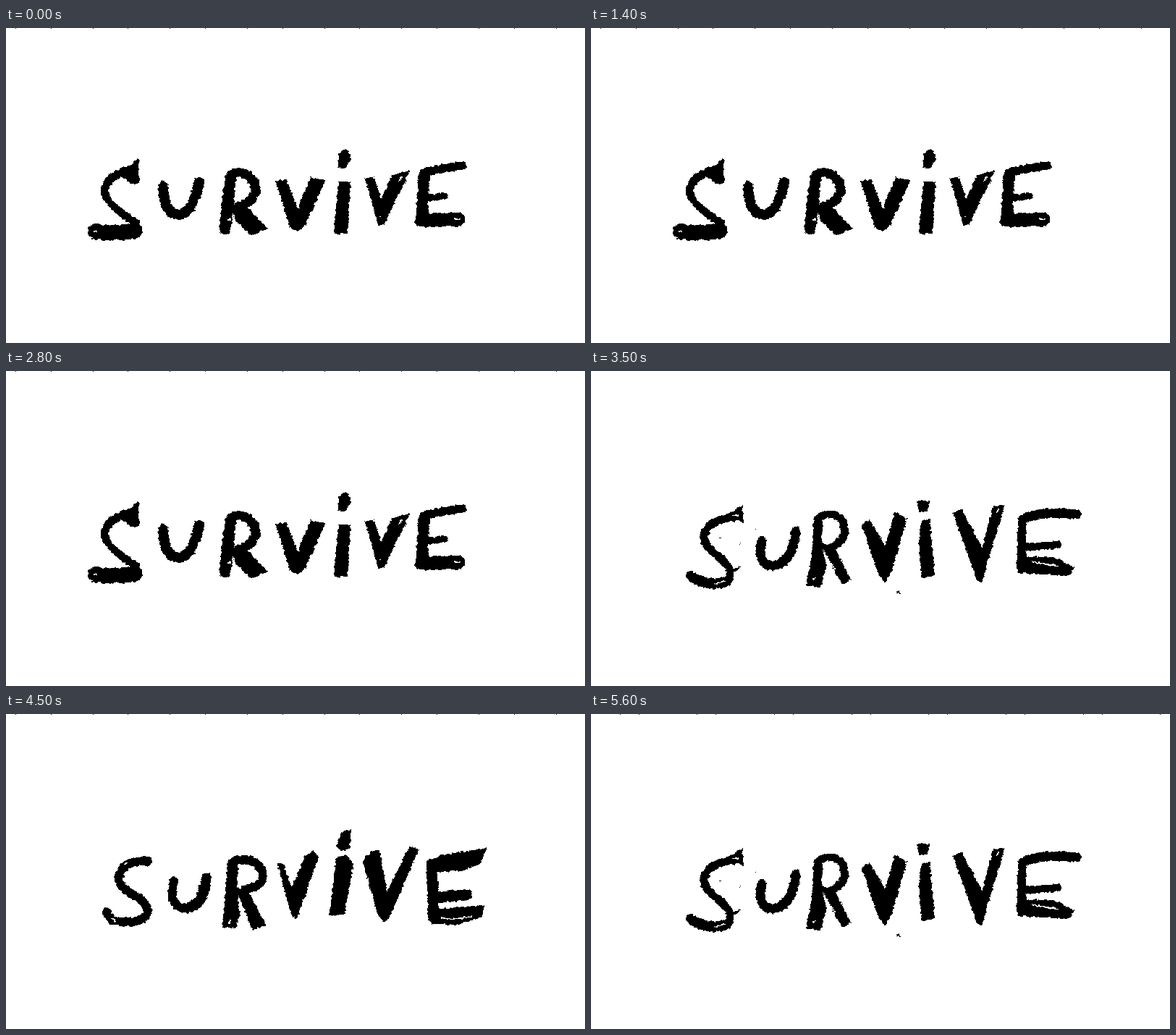
These frames come from a looping animation (800x435 px, 5.7 s). An HTML page:

```html
<!DOCTYPE html>
<html lang="en">
<head>
<meta charset="utf-8">
<title>Survive</title>
<style>
  html, body { margin: 0; width: 100%; height: 100%; overflow: hidden; background: #fff; }
  svg { display: block; width: 100%; height: 100%; }
</style>
</head>
<body>
<svg id="stage" viewBox="0 0 800 435" role="img" aria-label="Survive">
  <filter id="rough" x="0" y="0" width="800" height="435" filterUnits="userSpaceOnUse" color-interpolation-filters="sRGB">
    <feTurbulence type="fractalNoise" baseFrequency=".22" numOctaves="2" seed="4"/>
    <feDisplacementMap in="SourceGraphic" scale="5" xChannelSelector="R" yChannelSelector="G"/>
  </filter>
</svg>
<script>
const FRAME = 100;
// One letter per step: which drawing of the word is shown.
const ORDER = 'ACBCABABABABABACBACACABCABCBACABCABCBABCABABABABACABCBABC';

const stage = document.getElementById('stage');

function add(parent, tag, attrs) {
  const node = document.createElementNS('http://www.w3.org/2000/svg', tag);
  for (const key in attrs) node.setAttribute(key, attrs[key]);
  return parent.appendChild(node);
}

const show = (node, on) => node.setAttribute('visibility', on ? 'visible' : 'hidden');

// A word drawn with pen strokes of a given width, filled blots and scratched-out gaps.
function makeWord(draw) {
  const group = add(stage, 'g', {
    filter: 'url(#rough)', 'shape-rendering': 'crispEdges',
    'stroke-linecap': 'round', 'stroke-linejoin': 'round'
  });
  const line = (color, width, d) =>
    add(group, 'path', { d, fill: 'none', stroke: color, 'stroke-width': width });
  draw(
    (width, d) => line('#000', width, d),
    d => add(group, 'path', { d: d + 'Z', stroke: '#000', 'stroke-width': 2 }),
    d => line('#fff', 2, d)
  );
  return group;
}

const words = {
  A: makeWord((pen, blot, gap) => {
    // S
    pen(11, 'M172 195Q136 206 136 226Q138 242 180 270');
    blot('M160 204 182 181 183 214 170 213');
    pen(21, 'M123 281Q150 285 178 280');
    gap('M122 281h2');
    // U
    pen(14, 'M217 219Q218 258 240 258Q257 257 267 212');
    // R
    pen(16, 'M310 207 303 277');
    pen(13, 'M310 204Q320 194 336 205Q348 214 344 229Q338 242 318 248');
    blot('M312 248 333 249 360 277 338 285 318 265');
    gap('M309 265v-1');
    // V
    blot('M374 212 387 210 403 252 421 207 440 211 411 275 402 280 393 275');
    // i
    blot('M461 174 469 168 477 180 467 193 460 191');
    blot('M460 213 475 213 471 283 454 284');
    // V
    blot('M497 208 508 207 518 238 534 204 557 198 522 270 515 272');
    gap('M543 211 547 205');
    gap('M516 261h1');
    // E
    pen(16, 'M578 203 574 265');
    pen(12, 'M578 200Q600 194 630 190');
    pen(10, 'M580 235 606 232');
    pen(19, 'M574 266 625 264');
    gap('M621 264h6');
  }),

  B: makeWord((pen, blot, gap) => {
    // S
    pen(12, 'M197 203Q158 201 156 228Q157 240 180 252Q199 262 194 278Q182 292 146 285L139 273');
    gap('M165 208 167 206');
    gap('M147 283 151 286');
    // U
    pen(12, 'M232 231Q222 268 252 269');
    pen(15, 'M254 267Q272 262 277 226');
    // R
    pen(12, 'M316 203Q342 196 354 216Q360 238 330 242');
    blot('M308 202 320 206 319 240 322 278 317 294 300 294 303 255');
    blot('M318 240 334 246 358 291 341 297');
    gap('M309 288 310 285');
    // V
    blot('M376 208 382 207 395 242 414 197 424 190 431 197 402 281 396 280');
    // i
    blot('M464 164 476 160 474 185 463 188 458 182');
    blot('M457 200 470 195 479 207 467 275 448 278');
    // V
    blot('M494 203 505 190 516 189 526 249 558 183 569 188 530 278 522 286 514 275');
    // E
    pen(15, 'M588 207 591 281');
    blot('M582 205 600 196 663 186 655 206 630 216 597 217');
    pen(15, 'M596 253 636 250');
    blot('M588 271 660 265 657 279 625 290 588 289');
    gap('M602 282Q622 285 643 279');
  }),

  C: makeWord((pen, blot, gap) => {
    // S
    pen(11, 'M200 202Q158 204 156 232Q160 244 178 258Q200 275 188 289');
    blot('M188 200 208 187 210 209');
    pen(14, 'M138 283Q160 299 188 291');
    pen(4, 'M190 280 205 271');
    gap('M196 200 203 199');
    gap('M170 294 185 290');
    // U
    pen(13, 'M236 235Q228 270 254 269');
    pen(13, 'M252 269Q278 266 283 221');
    // R
    pen(11, 'M314 204Q332 190 347 206Q358 232 334 242');
    blot('M309 201 319 206 318 240 324 268 317 297 298 296 306 255');
    blot('M316 236 336 244 358 288 348 294');
    gap('M308 287 310 286');
    gap('M332 265 337 273');
    // V
    blot('M375 213 385 206 407 245 420 196 436 204 413 280 406 290 398 280');
    // i
    blot('M451 181 467 181 464 192 454 194');
    blot('M457 209 467 205 474 282 457 285 454 235');
    // V
    blot('M501 196 512 192 541 247 556 188 570 186 540 290 534 289');
    gap('M561 194 563 191');
    // E
    pen(13, 'M598 204Q620 193 671 198');
    pen(12, 'M596 205 594 272');
    pen(10, 'M600 243 645 240');
    blot('M592 257 640 258 666 272 660 282 592 278');
    gap('M610 264 645 269');
    // Stray specks
    pen(1.5, 'M422 306Q424 303 427 306');
    pen(1, 'M176 230h3M227 218h1M206 238h1');
  })
};

// Marks along the top edge, repeated across the width.
function makeTicks(...offsets) {
  let d = '';
  for (const offset of offsets)
    for (let x = offset; x < 800; x += 320 / 3) d += `M${Math.floor(x)} 0h1v1h-1Z`;
  return add(stage, 'path', { d, 'shape-rendering': 'crispEdges' });
}

const wideTicks = makeTicks(13.4, 62.2);
const closeTicks = makeTicks(40, 66.3);
const baseLine = add(stage, 'rect', { x: 0, y: 434, width: 800, height: 1, fill: '#f8f8f8' });

function render(now) {
  const step = Math.floor(now / FRAME) % ORDER.length;
  for (const name in words) show(words[name], name === ORDER[step]);
  show(wideTicks, step < 31 || (step > 36 && step < 55));
  show(closeTicks, step >= 55);
  show(baseLine, step < 13);
}

const start = performance.now();
function loop() {
  render(performance.now() - start);
  requestAnimationFrame(loop);
}
loop();
</script>
</body>
</html>
```
